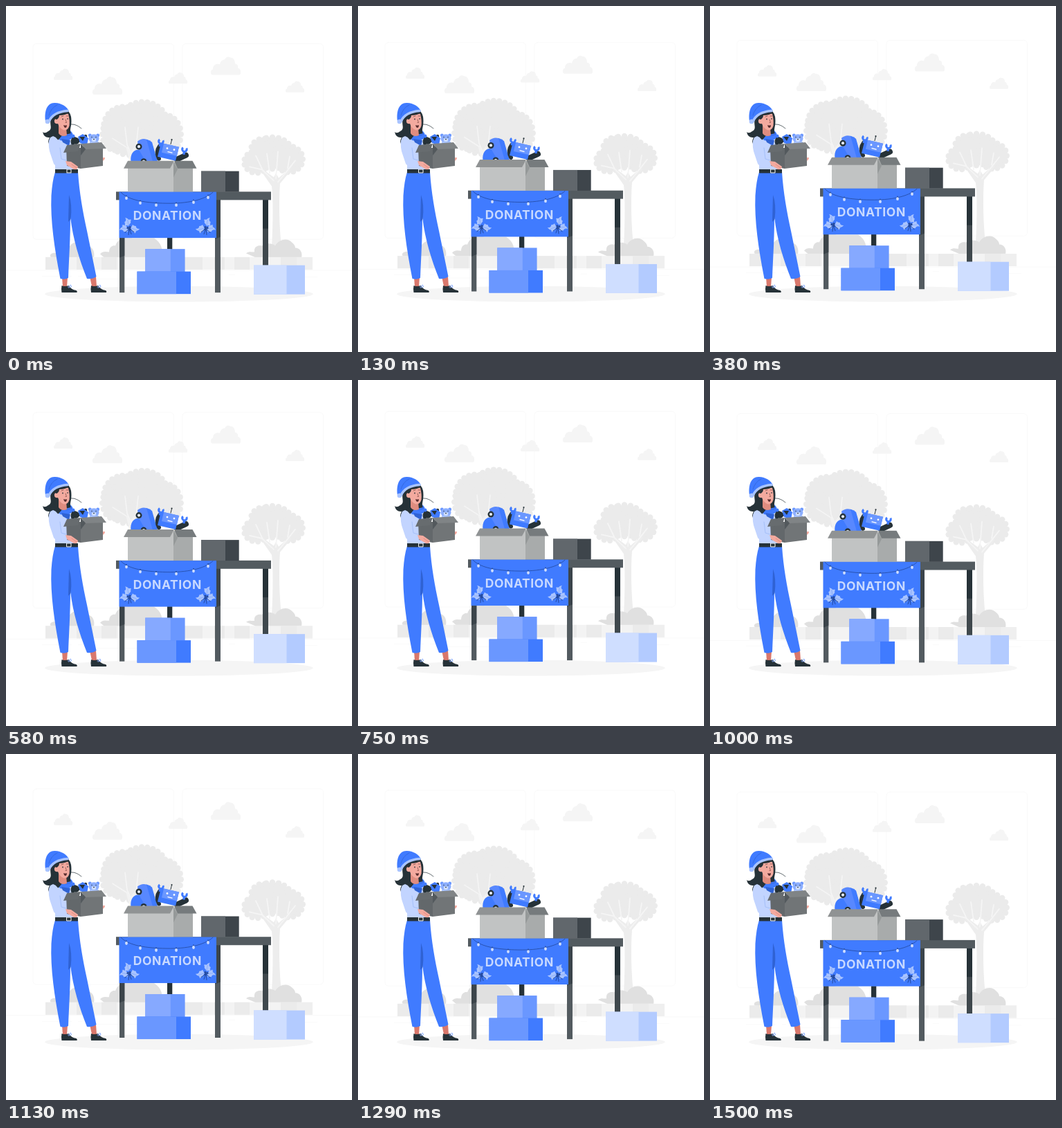
Recreate the animation shown at these times as an HTML page with a canvas. Size 500 by 500 pixels, loop 1540 ms.

```html
<!DOCTYPE html>
<html lang="en">
<head>
<meta charset="utf-8">
<title>Donation table</title>
<style>
html, body { margin: 0; width: 100%; height: 100%; overflow: hidden; background: #fff; }
canvas { display: block; width: 500px; height: 500px; }
</style>
</head>
<body>
<canvas id="stage" width="500" height="500"></canvas>
<script>
const ctx = document.getElementById('stage').getContext('2d');
const LOOP = 1540, PEAK = 725, LIFT = 10;
const BLUE = '#407bff', MID = '#6a97ff', SOFT = '#8caeff', PALE = '#cfdeff', LEAF = '#a9c4ff';
const NAVY = '#244a9c', SHADE = '#2f62d3', INK = '#263238', STEEL = '#535b60', SKIN = '#f3aa9f';

function fill(d, color) {
  ctx.fillStyle = color;
  ctx.fill(new Path2D(d));
}
function line(d, color, width = 1) {
  ctx.strokeStyle = color;
  ctx.lineWidth = width;
  ctx.lineCap = ctx.lineJoin = 'round';
  ctx.stroke(new Path2D(d));
}
function rect(x, y, w, h, color) {
  ctx.fillStyle = color;
  ctx.fillRect(x, y, w, h);
}
function oval(x, y, rx, ry, color) {
  ctx.fillStyle = color;
  ctx.beginPath();
  ctx.ellipse(x, y, rx, ry, 0, 0, Math.PI * 2);
  ctx.fill();
}
function at(x, y, draw, sx = 1, sy = sx, turn = 0) {
  ctx.save();
  ctx.translate(x, y);
  ctx.rotate(turn);
  ctx.scale(sx, sy);
  draw();
  ctx.restore();
}
function box(x, y, w, h, split, front, side) {
  rect(x, y, w, h, side);
  rect(x, y, split, h, front);
}

function cloud() {
  fill('M2 26C-1 25 -1 19 3 18C3 12 8 9 13 11C14 5 18 4 20 4C22 0 25 -1 28 1C33 1 35 5 35 10C38 10 40 13 39 16C44 17 44 24 42 26Z', '#f5f5f5');
}

// An oval of leaves with a scalloped rim.
function crown(x, y, rx, ry) {
  const color = '#ebebeb', leaf = 4.2;
  const a = rx - leaf, b = ry - leaf;
  const count = Math.round(Math.PI * (a + b) / 8);
  oval(x, y, a, b, color);
  for (let i = 0; i < count; i++) {
    const turn = i / count * Math.PI * 2;
    oval(x + Math.cos(turn) * a, y + Math.sin(turn) * b, leaf, leaf, color);
  }
}

function windows() {
  ctx.strokeStyle = '#f7f7f7';
  ctx.lineWidth = 0.7;
  for (const x of [39, 255]) {
    ctx.beginPath();
    ctx.roundRect(x, 55, 203.5, 282.8, 5);
    ctx.stroke();
  }
}

function backdrop() {
  windows();
  rect(0, 382.4, 500, 0.4, '#efefef');
  for (const [x, y, w] of [[417, 391.9, 33], [322, 389.2, 9], [52, 390.9, 43], [104, 390.9, 6], [131, 395.1, 94]])
    rect(x, y, w, 0.3, '#ededed');

  for (const [x, y, s] of [[69, 91, 0.63], [125, 102.5, 1], [235, 96.5, 0.63], [296, 74, 1], [404, 109, 0.63]])
    at(x, y, cloud, s);

  crown(198, 172, 40, 37);
  crown(170, 175, 33, 33);
  crown(157, 186, 22, 27);
  crown(230, 186, 27, 32);
  crown(178, 200, 28, 20);
  line('M172 176L175 201L190 236M154 192L176 206M191 176L188 205', '#f5f5f5', 1.6);
  fill('M173 203L180 211L186 204L190 235H181Z', '#f2f2f2');

  crown(385, 213, 33, 27);
  crown(362, 226, 22, 20);
  crown(409, 222, 24, 23);
  crown(372, 208, 22, 20);
  fill('M384 348C386 310 386 280 384 261L368 238L372 237L387 248L390 242L394 249L409 236L412 238L396 257C394 285 395 320 398 348Z', '#ededed');
  line('M361 217L371 238L387 253M377 214L381 242M393 211L390 250M418 224L407 238L393 255M410 218L407 235M352 233L370 237', '#f5f5f5', 1.8);

  fill('M65 364C61 359 69 356 74 358C74 350 84 346 90 351C95 340 111 337 117 348C124 347 129 355 127 364Z', '#e0e0e0');
  fill('M136 359C140 354 145 356 149 356C149 348 155 346 158 347C161 337 173 333 183 336H214C224 342 228 353 225 364H142Z', '#e0e0e0');
  fill('M347 358C352 354 356 357 359 356C358 348 364 346 370 347C376 342 386 344 389 347C394 338 407 335 413 342C418 346 418 349 418 350C425 350 429 357 427 364H361Z', '#e0e0e0');

  rect(57, 363.5, 386, 18, '#f3f3f3');
  for (const [x, w] of [[57, 18], [102, 24], [138, 22], [211, 18], [256, 28], [301, 15], [330, 22], [397, 23]])
    rect(x, 363.5, w, 18, '#ebebeb');
  rect(420, 363.5, 23, 18, '#efefef');
}

function claw() {
  ctx.strokeStyle = BLUE;
  ctx.lineWidth = 3.2;
  ctx.lineCap = 'butt';
  ctx.beginPath();
  ctx.arc(0, 0, 3.4, -0.7, Math.PI + 0.7);
  ctx.stroke();
  rect(-1.8, 3, 3.6, 5, BLUE);
}

function car() {
  fill('M180.5 225C179 215 184 208 191 208L200 211L206 225Z', BLUE);
  fill('M190 196Q196 191 203 193L209 195L219 225H202L192 208Z', '#5888ff');
  fill('M203 193L211 197L219 225H212Z', BLUE);
  for (const [x, y] of [[192, 203.5], [199, 225]]) {
    oval(x, y, 4.5, 4.5, INK);
    oval(x, y, 2.1, 2.1, '#e8efff');
  }
}

function robot() {
  line('M222 203Q216 211 221 221', INK, 6);
  line('M247 222L260 216', INK, 8);
  at(224, 196, claw, 0.95, 0.95, 0.25);
  at(258, 207.5, claw, 0.95, 0.95, 0.15);
  line('M238 200L239.5 194', INK, 1);
  oval(239.5, 193.5, 1.1, 1.1, INK);
  fill('M224 198L250 204L245 224L219 218Z', BLUE);
  fill('M228 199L250 204L247 217L225 212Z', MID);
  oval(233, 206, 1.4, 1.4, '#fff');
  oval(243, 208, 1.4, 1.4, '#fff');
  line('M234 211L240 212.5', '#fff', 1.3);
}

function hollyLeaf() {
  fill('M0 0Q-3 -2 -6 -2Q-4 -5 -5 -8Q-3 -8 -2 -10Q-1 -12 -2 -15Q2 -13 3 -10Q6 -10 7 -9Q5 -7 5 -4Q3 -3 0 0Z', LEAF);
  line('M0 0L1 -10', '#7199f5', 0.6);
}
function holly() {
  at(-1, -4, hollyLeaf, 0.85, 0.85, -0.25);
  at(-1, 0, hollyLeaf, 0.88, 0.88, -1.6);
  at(2, -1, hollyLeaf, 0.88, 0.88, 1.8);
  line('M-6 6L0 0L3 8M0 0L7 5M0 0L-1 9', NAVY, 1);
  for (const [x, y] of [[-2, -1], [1, -2], [1, 1]]) oval(x, y, 1.6, 1.6, NAVY);
}

function banner() {
  rect(163.5, 269, 140.5, 66.5, BLUE);
  line('M166 269.5C177 281.5 203 285 232 285.5C260 286 287 281 299 269.5', NAVY, 0.8);
  for (const [x, y] of [[174, 278], [194, 285], [217, 288], [246, 288], [271, 284], [292, 277]]) {
    rect(x - 0.8, y - 4, 1.6, 2.5, NAVY);
    oval(x, y, 1.9, 2.4, PALE);
  }
  ctx.fillStyle = '#c8d9ff';
  ctx.font = '700 17.5px Inter, sans-serif';
  ctx.textAlign = 'center';
  ctx.letterSpacing = '0.6px';
  ctx.fillText('DONATION', 233.3, 309.7);
  at(178, 322, holly);
  at(289, 322, holly, -1, 1);
}

function openBox() {
  box(176, 226, 94, 43, 66, '#c1c3c3', '#a8abab');
  fill('M242 226L248 236L242 248Z', '#959999');
  fill('M176 224H243L237 235H170Z', '#909394');
  fill('M243 224H269.5L275.5 235H248Z', '#767b7d');
}

function table() {
  rect(233, 335, 7.3, 18, INK);
  rect(371, 280, 8, 95, INK);
  rect(371, 322, 8, 53, '#3f484d');
  rect(159, 268.7, 224, 12, STEEL);
  rect(164, 335, 7.3, 79.5, STEEL);
  fill('M164 335H171.3V361L164 364Z', '#3b444a');
  rect(302, 280, 8, 134.5, STEEL);
  fill('M302 280.7H310V334L302 337Z', '#3b444a');
  car();
  robot();
  openBox();
  box(282, 239, 54.7, 30, 35, '#61676c', '#3e454b');
  banner();
  box(201.3, 351.5, 57.3, 33, 36.5, '#86a9ff', MID);
  box(189.5, 384, 77.5, 32.5, 56.5, MID, BLUE);
  box(358, 375, 74, 42, 47.5, PALE, '#b3cbff');
}

function shoe() {
  fill('M0 0Q4 2 10 0Q14 6 21 7Q23 8 22 10H0Q-1 5 0 0Z', INK);
  line('M9 2L13 -1L14 2L10 3', SOFT, 1);
}

function legs() {
  fill('M81 392H89L88 406H82Z', '#d9786c');
  fill('M121 391H130L131 405H124Z', '#d9786c');
  at(80.5, 404, shoe);
  at(123, 404, shoe);
  fill('M71 240H104C106 270 111 297 117 325L130.5 391Q125 395 117 394C106 366 97 338 93 305C93 336 91 366 90 393Q85 396 78.5 394C70 350 64 310 65.5 274Q67 252 71 240Z', BLUE);
  fill('M91 273Q96 286 93.5 308L90 312Z', SHADE);
  rect(71, 236, 33, 5.5, INK);
  ctx.strokeStyle = '#fff';
  ctx.lineWidth = 1;
  ctx.strokeRect(88, 236, 6, 5);
}

function head() {
  line('M89 172Q99 168 109 177', INK, 0.7);
  fill('M66 160C61 171 69 177 61 181Q56 185 53 182Q55 191 63 190Q60 195 62 199Q74 198 81 187L94 184C91 178 96 174 94 160Q91 148 82 150Z', INK);
  fill('M76 170L87 176L88 187Q80 190 76 184Z', '#df8d80');
  fill('M74 158Q82 153 90 156Q92.5 165 91.5 173Q89.5 180 84 179.5Q77 177 75 170Q69 171 70 165Q71 162 74 164Z', SKIN);
  fill('M73 164Q77 162 77 158Q86 158 91 154L82 150L68 159Z', INK);
  oval(82, 163.5, 0.8, 1.1, INK);
  oval(89, 163, 0.7, 1, INK);
  line('M80 160L83 159M87 159L90 159M86 164L87.5 168.5L86 168.5', '#7a4540', 0.7);
  fill('M83 172Q86 173 88 172Q88 176 85.5 176Q83.5 175 83 172Z', '#5c2f30');
  fill('M57 166C55 151 60 139 71 140C80 140.5 88 145 91 152Q72 150 63 168Z', BLUE);
  line('M74 143Q65 147 62 158', SHADE, 0.7);
  line('M62 167Q68 153 89 151.5', LEAF, 3.6);
  oval(60, 167, 3.3, 3.3, LEAF);
}

function torso() {
  fill('M66 188Q78 185 91 192L101 208L102 236H71C72 218 66 206 63 198Z', '#c2d4ff');
  fill('M75 181Q86 184 93 180Q98 185 97 190Q90 197 78 194L72 187Z', BLUE);
  fill('M80 192L93 194L91 202L82 197Z', SHADE);
  line('M78 186Q87 190 95 185', SHADE, 0.7);
}

function carriedToys() {
  line('M97 201Q94 193 99 191L105 195L115 188', INK, 4.5);
  oval(101, 195, 5, 5, INK);
  oval(97.5, 188, 2, 2.5, BLUE);
  fill('M104 189L111 185L119 191L117 201L107 198Z', BLUE);
  fill('M106 189L114 189L111 195Z', INK);
  oval(121.3, 187, 2.4, 2.4, MID);
  oval(132.7, 187, 2.4, 2.4, MID);
  oval(127, 191.5, 7.5, 6.2, SOFT);
  oval(127, 193.5, 3.3, 2.5, PALE);
  for (const x of [124, 130]) oval(x, 189.5, 0.7, 0.7, INK);
  oval(127, 192.5, 1, 0.7, INK);
  rect(121, 196, 13, 4, LEAF);
}

function carriedBox() {
  fill('M137 219L143 219Q143 223 139 224Z', SKIN);
  carriedToys();
  fill('M87 204L108 205V235L88 231Z', '#63686b');
  fill('M108 204L140 201V231L108 235Z', '#717577');
  fill('M88 201L108 199L104 210L83 212Z', '#676c6f');
  fill('M108 199L138 197L145 206L115 207Z', '#808486');
  fill('M108 199L115 207L108 216Z', '#53595d');
}

function arm() {
  fill('M64 190Q60 196 63 210L69 228Q72 232 79 231L89 230L87 223L80 221L78 203Q76 190 68 188Z', '#c2d4ff');
  line('M78 205L80 221L87 223', '#9ebaf5', 0.8);
  fill('M86 224L94 225L104 232Q104 237 98 236L88 230Z', SKIN);
  line('M95 229L102 234', '#d9786c', 0.6);
}

function woman() {
  legs();
  torso();
  head();
  carriedBox();
  arm();
}

// A steady rise to the peak and a steady fall back.
function lift(time) {
  const phase = (time - PEAK + LOOP) / LOOP % 1;
  return -LIFT * Math.abs(1 - 2 * phase);
}

function frame(now) {
  const y = lift(now % LOOP);
  ctx.clearRect(0, 0, 500, 500);
  at(0, y, backdrop);
  oval(250, 416.2, 193.9, 11.3, '#f5f5f5');
  at(0, y + 0.25, table);
  woman();
  requestAnimationFrame(frame);
}
requestAnimationFrame(frame);
</script>
</body>
</html>
```
